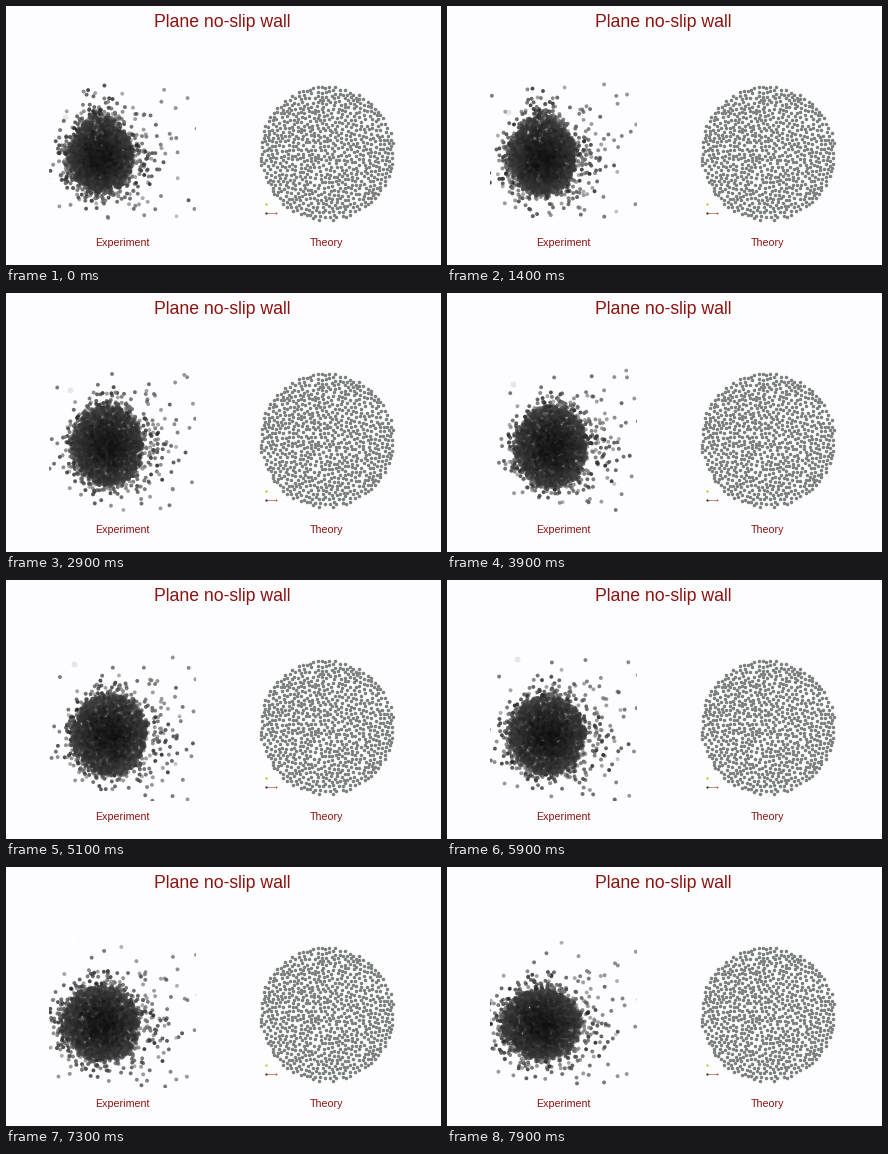
A matplotlib script that plays this animation: 435x259 px, repeating every 8000 ms.

```python
import numpy as np
import matplotlib.pyplot as plt
from matplotlib.animation import FuncAnimation
from matplotlib.patches import Rectangle

W, H, DPI = 435, 259, 64
FRAMES, INTERVAL, HOLD = 80, 100, 6
PT = 72 / DPI  # points per pixel
RED = "#8c140f"
LEFT, TOP, SIDE = 43, 74, 147  # window of the experiment
rng = np.random.default_rng(11)

fig = plt.figure(figsize=(W / DPI, H / DPI), dpi=DPI, facecolor="#fdfcfe")
ax = fig.add_axes([0, 0, 1, 1])
ax.set_xlim(0, W)
ax.set_ylim(H, 0)
ax.axis("off")


def label(x, y, text, px):
    ax.text(x, y, text, color=RED, fontsize=px * PT, ha="center",
            va="baseline", family="Liberation Sans")


def dots(xy, px, color, **style):
    return ax.scatter(*np.transpose(xy), s=(px * PT) ** 2, color=color,
                      linewidth=0, **style)


def greys(shade, alpha):
    return np.c_[shade, shade, shade, alpha]


def packed_disc(cx, cy, radius, gap, count):
    """Random points in a disc, no two closer than gap."""
    pts = np.empty((count, 2))
    n = 0
    for _ in range(30000):
        p = rng.uniform(-radius, radius, 2)
        if p @ p > radius ** 2:
            continue
        if n and ((pts[:n] - p) ** 2).sum(axis=1).min() < gap ** 2:
            continue
        pts[n] = p
        n += 1
        if n == count:
            break
    return pts[:n] + (cx, cy)


label(216, 21, "Plane no-slip wall", 17.6)
label(116.3, 240.5, "Experiment", 10.6)
label(320.5, 240.5, "Theory", 10.6)

# Theory: a still disc of beads and a small axis marker
dots(packed_disc(320.5, 147, 67, 3.2, 790), 3.5, "#7a7e7c")
ax.plot([260, 270], [206.5, 206.5], color="#b0452c", lw=0.6 * PT)
dots([(260, 206.5)], 2.2, "#2c2a10", zorder=3)
dots([(270, 206.5)], 1.8, "#a0501c", zorder=3)
dots([(260, 197.5)], 2.2, "#c9bd10", zorder=3)

# Experiment: a dense core, a loose halo and lone strays
HALO, CORE, STRAYS = 520, 2600, 22
N = HALO + CORE
theta = rng.uniform(-np.pi, np.pi, N)
spread = rng.exponential(1, HALO)
depth = rng.uniform(0, 1, CORE) ** 0.6
phase = rng.uniform(0, 2 * np.pi, N)
speed = rng.uniform(0.15, 0.4, N) * rng.choice([-1, 1], N)
sway = np.r_[rng.uniform(1.5, 4, HALO), rng.uniform(1, 3, CORE)]
cloud_color = np.r_[
    greys(rng.uniform(0.13, 0.5, HALO), rng.uniform(0.6, 0.9, HALO)),
    greys(0.04 + 0.14 * depth ** 2 + rng.uniform(0, 0.1, CORE),
          np.full(CORE, 0.5))]

stray_x = LEFT + SIDE * rng.beta(2, 1, STRAYS)
stray_y = rng.uniform(0, SIDE, STRAYS)
stray_rise = rng.uniform(0.3, 1, STRAYS)
stray_color = greys(rng.uniform(0.2, 0.5, STRAYS),
                    rng.uniform(0.4, 0.8, STRAYS))


def bump(x, centre, width):
    return np.exp(-((x - centre) / width) ** 2)


def cloud_at(t):
    s = (t - HOLD) / (FRAMES - 1 - HOLD)
    arc = np.sin(np.pi * s)
    cx, cy = 95 + 10 * arc ** 2, 151 + 6 * s
    rx, ry = 32 + 7 * s, 33 + 6 * arc
    tilt = np.radians(-25) * bump(s, 0.85, 0.1)
    plume = 0.32 * bump(s, 0, 0.22)
    fringe = 0.17 + 0.04 * np.cos(2 * np.pi * s)
    extra = 0.25 + 0.2 * arc

    a = theta - tilt
    edge = rx * ry / np.hypot(ry * np.cos(a), rx * np.sin(a))
    edge *= 1 + plume * bump(theta, np.radians(95), 0.38)
    lean = np.clip(np.cos(theta[:HALO] - 0.1), 0, 1) ** 2
    reach = np.r_[0.92 + spread * (fringe + extra * lean), depth]
    turn = phase + speed * t
    return np.c_[cx + edge * reach * np.cos(theta) + sway * np.cos(turn),
                 cy - edge * reach * np.sin(theta) + sway * np.sin(turn)]


def strays_at(t):
    return np.c_[stray_x + 2 * np.sin(stray_y + 0.1 * t),
                 TOP + (stray_y - stray_rise * t) % SIDE]


def ghost_at(t):
    """A pale out-of-focus speck that rises at the left."""
    return [(59 + 0.2 * (t - HOLD), 111 - 0.6 * (t - HOLD))]


window = Rectangle((LEFT, TOP), SIDE, SIDE, transform=ax.transData)
ghost = dots(ghost_at(HOLD), 6, (0.3, 0.3, 0.3, 0.12))
strays = dots(strays_at(HOLD), 3.9, stray_color)
cloud = dots(cloud_at(HOLD), 3.9, cloud_color)
for layer in (ghost, strays, cloud):
    layer.set_clip_path(window)


def draw(frame):
    t = max(frame, HOLD)
    cloud.set_offsets(cloud_at(t))
    strays.set_offsets(strays_at(t))
    ghost.set_offsets(ghost_at(t))
    return cloud, strays, ghost


anim = FuncAnimation(fig, draw, frames=FRAMES, interval=INTERVAL,
                     repeat=True, repeat_delay=0)
plt.show()
```
